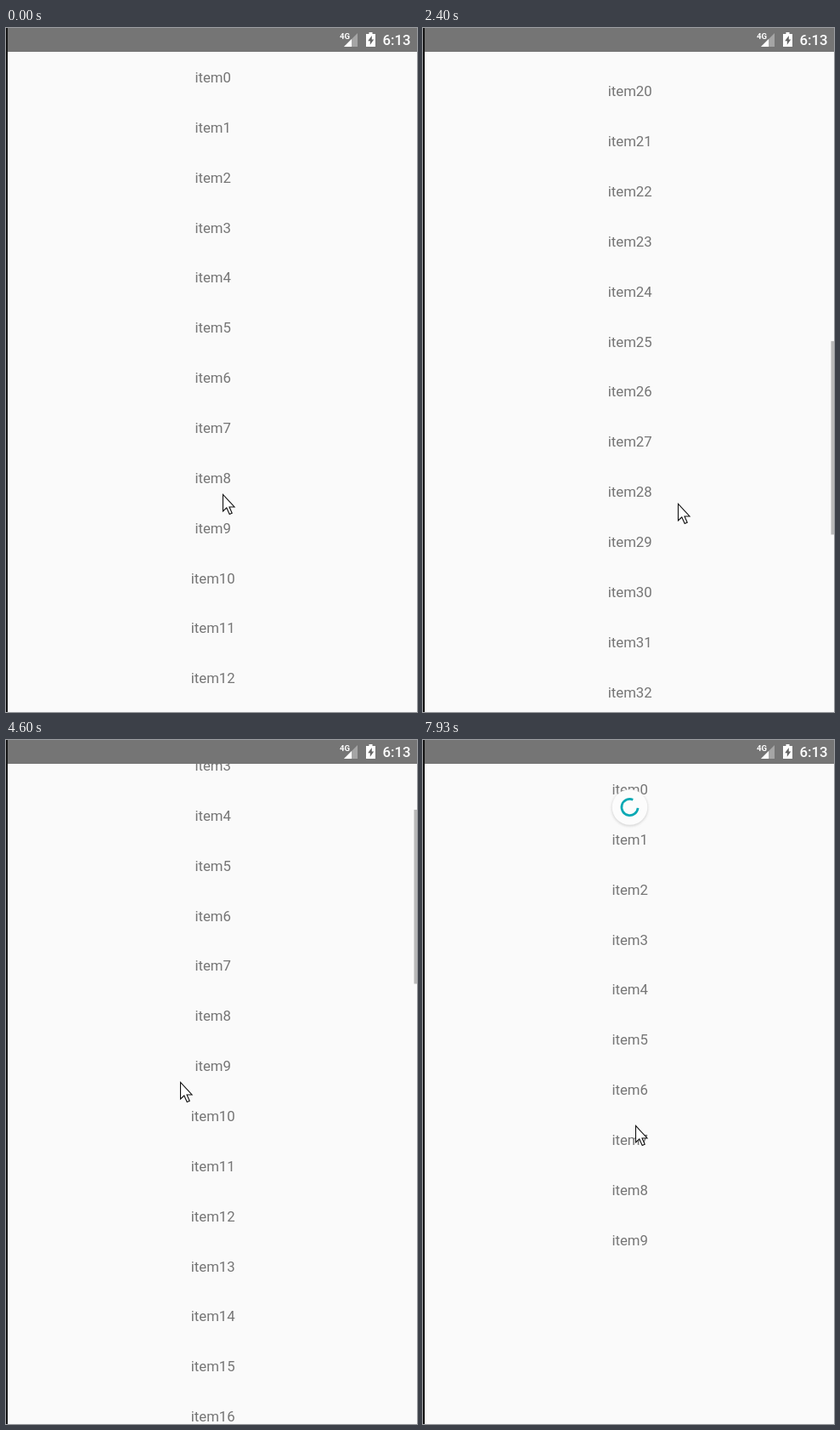
Recreate the animation shown at these times as an HTML page. Size 484x804 px, loop 8 s.

```html
<!DOCTYPE html>
<html lang="en">
<head>
<meta charset="utf-8">
<title>Refreshable list</title>
<style>
  html, body { margin: 0; width: 100%; height: 100%; overflow: hidden; background: #fafafa; }
  svg { display: block; width: 100vw; height: 100vh; }
  text { font-family: Roboto, sans-serif; }
  #list text { font-size: 16.8px; fill: #757575; text-anchor: middle; }
</style>
</head>
<body>
<svg viewBox="0 0 484 804" xmlns="http://www.w3.org/2000/svg">
  <defs>
    <filter id="soft" x="-30%" y="-30%" width="160%" height="160%"><feGaussianBlur stdDeviation="1.6"/></filter>
  </defs>
  <rect width="484" height="804" fill="#fafafa"/>
  <g id="list"></g>
  <rect id="thumb" x="480.5" width="3.5" fill="#b8b8b8"/>
  <path id="glow" fill="#fff"/>
  <g id="spinner">
    <circle r="21.3" cy="1" fill="#d4d4d4" filter="url(#soft)"/>
    <circle r="20.8" fill="#fcfcfc"/>
    <path id="arc" fill="none" stroke="#0aa9b4" stroke-width="2.7"/>
  </g>
  <rect width="484" height="28" fill="#757575"/>
  <g fill="#fff">
    <text x="393" y="13" font-size="9.5" font-weight="700">4G</text>
    <path d="M414 6V22H398Z" opacity=".35"/>
    <path d="M407 13V22H398Z"/>
    <path d="M427.5 5h4v2h3.5v15h-11V7h3.5Z"/>
    <path d="M430.8 9l-4.6 6.2h2.6v4.6l4.4-6.3h-2.4Z" fill="#656565"/>
    <text x="443.5" y="20" font-size="16.8" font-weight="500">6:13</text>
  </g>
  <rect width="2" height="804" fill="#141414"/>
  <path id="cursor" d="M.5 .5V20L4.8 16L8.2 23.5L11.2 22.2L8 15H14Z" fill="#fff" stroke="#111" stroke-width="1.1"/>
</svg>
<script>
const LOOP = 8000, STEP = 200 / 3;
const ROW = 58.86, TOP = 28, VIEW = 776, PAGE = 15, MAX = 50, AHEAD = 360;
const $ = id => document.getElementById(id);
const clamp = (v, a = 0, b = 1) => Math.min(b, Math.max(a, v));
const ramp = (t, a, b) => clamp((t - a) / (b - a));
const ease = u => u * u * (3 - 2 * u);
const mix = (a, b, u) => a + (b - a) * u;

// A drag speeds up from (x, y); the list then coasts on by `fling`
const swipe = (at, x, y, drag, fling, time = 280) => ({ at, x, y, drag, fling, end: at + time });
const pull = swipe(6200, 225, 430, 342, 0, 650);
const swipes = [
  swipe(70, 255, 548, -200, -94),
  swipe(1050, 265, 550, -242, -191),
  swipe(1720, 285, 555, -250, -191),
  swipe(2440, 300, 559, -230, -173),
  swipe(3050, 305, 329, 250, 124),
  swipe(3520, 304, 340, 250, 124),
  swipe(4050, 308, 330, 260, 430),
  swipe(4920, 169, 340, 271, 0),
  pull,
  swipe(7400, 245, 453, 0, 0)
];
const progress = (s, t) => ramp(t, s.at, s.end) ** 1.5;
const moved = (s, t) => s.drag * progress(s, t) + s.fling * (1 - (1 - ramp(t, s.end, s.end + 600)) ** 3);
const total = (list, t) => list.reduce((sum, s) => sum - moved(s, t), 0);

const rows = Array.from({ length: 15 }, () => {
  const el = document.createElementNS('http://www.w3.org/2000/svg', 'text');
  el.setAttribute('x', 243.7);
  return $('list').appendChild(el);
});

function set(id, attrs) {
  for (const k in attrs) $(id).setAttribute(k, attrs[k]);
}

// Pages load ahead of the furthest point reached; the refresh leaves ten items
function itemCount(t) {
  if (t >= 7900) return 10;
  const reach = total(swipes.filter(s => s.drag < 0), t);
  return Math.min(MAX, PAGE * Math.ceil((reach + VIEW + AHEAD) / (PAGE * ROW)));
}

function drawList(t, offset) {
  const count = itemCount(t), first = Math.floor(offset / ROW);
  rows.forEach((el, i) => {
    const n = first + i;
    el.textContent = n < count ? 'item' + n : '';
    el.setAttribute('y', 64 + n * ROW - offset);
  });
  const scale = VIEW / (count * ROW);
  set('thumb', {
    y: TOP + offset * scale,
    height: Math.min(VIEW, VIEW * scale),
    opacity: t < 100 ? 0 : 1 - ramp(t, 5500, 5750)
  });
}

function drawGlow(t, over) {
  const k = clamp(over / 135) * (1 - ease(ramp(t, 5250, 5850)));
  const side = TOP + 46 * k, mid = TOP + 122 * k;
  set('glow', { d: `M2 ${TOP}H484V${side}Q243 ${mid} 2 ${side}Z`, opacity: .5 * k });
}

function arcPath(start, sweep, r = 9.6) {
  const at = deg => {
    const a = deg * Math.PI / 180;
    return (r * Math.cos(a)).toFixed(2) + ' ' + (r * Math.sin(a)).toFixed(2);
  };
  return `M${at(start)}A${r} ${r} 0 ${sweep > 180 ? 1 : 0} 1 ${at(start + sweep)}`;
}

function drawSpinner(t) {
  const p = progress(pull, t), spinAt = pull.end + 200;
  const y = 7 + 113 * p - 41 * ease(ramp(t, pull.end, spinAt));
  let start = -90 + 200 * p, sweep = 288 * clamp(p * 1.4) + 1;
  if (t > spinAt) {
    const turns = (t - 7267) / 1332, whole = Math.floor(turns), u = 2 * (turns - whole);
    const head = 288 * ease(clamp(u)), tail = 288 * ease(clamp(u - 1));
    start = 5 + 216 * (turns - .5) + 288 * whole + tail;
    sweep = Math.max(10, head - tail);
  }
  set('spinner', { transform: `translate(243.5 ${y})`, visibility: p > 0 ? 'visible' : 'hidden' });
  set('arc', { d: arcPath(start, sweep), opacity: .3 + .7 * ramp(p, .4, .75) });
}

// The pointer follows each drag, then glides to where the next one starts
function drawCursor(t) {
  const i = Math.max(0, swipes.findLastIndex(s => t >= s.at));
  const s = swipes[i], next = swipes[i + 1], p = progress(s, t);
  let x = s.x + 5 * p, y = s.y + s.drag * p;
  if (next) {
    const u = ease(ramp(t, s.end, Math.min(next.at, s.end + 400)));
    x = mix(x, next.x, u);
    y = mix(y, next.y, u);
  }
  set('cursor', { transform: `translate(${Math.round(x)} ${Math.round(y)})` });
}

function draw(time) {
  const t = Math.floor((time % LOOP + 5) / STEP) * STEP % LOOP;
  const offset = total(swipes, t);
  drawList(t, Math.max(0, offset));
  drawGlow(t, -offset);
  drawSpinner(t);
  drawCursor(t);
}

let begin;
function tick(now) {
  begin ??= now;
  draw(now - begin);
  requestAnimationFrame(tick);
}
draw(0);
requestAnimationFrame(tick);
</script>
</body>
</html>
```
